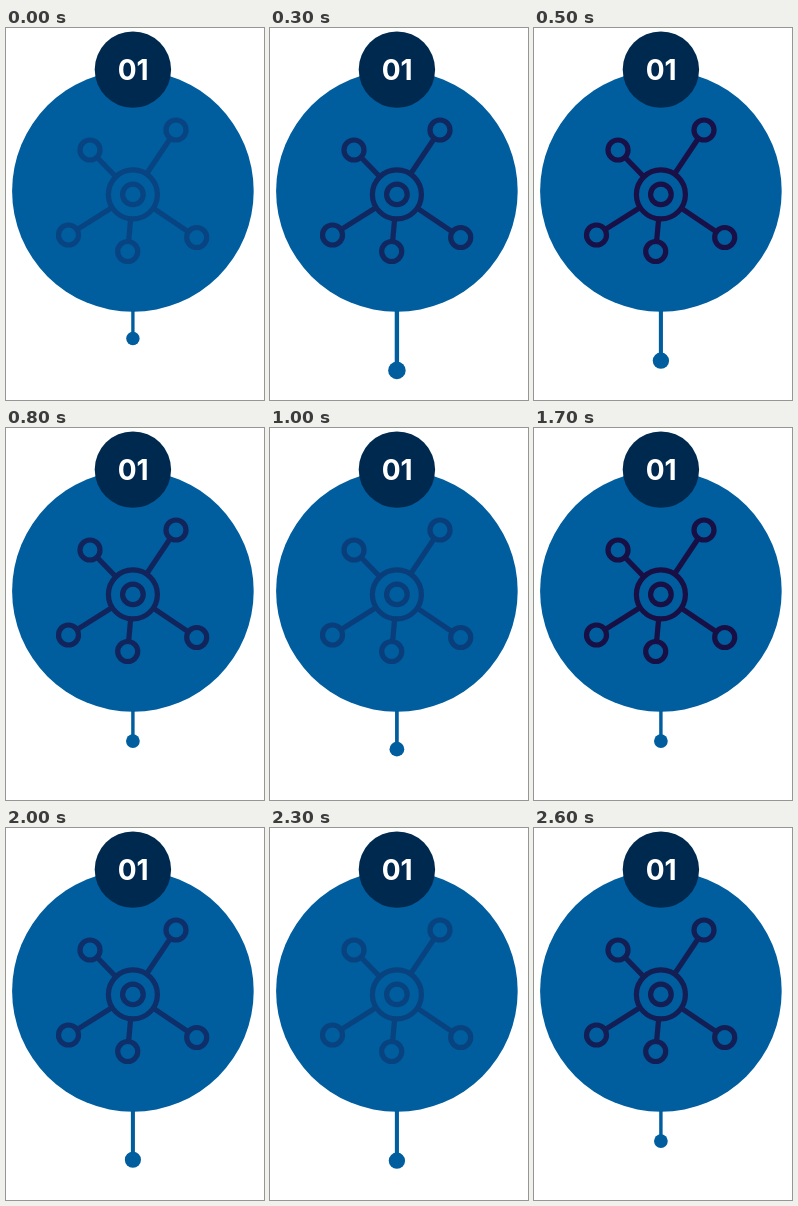
These frames come from a looping animation (258x372 px, 2.7 s). An HTML page with a canvas:

```html
<!DOCTYPE html>
<html lang="en">
<head>
<meta charset="utf-8">
<title>Network badge</title>
<style>
  html, body { margin: 0; width: 100%; height: 100%; overflow: hidden; background: #fff; }
  canvas { display: block; width: 258px; height: 372px; }
</style>
</head>
<body>
<canvas id="stage"></canvas>
<script>
const WIDTH = 258, HEIGHT = 372, LOOP = 2700, STEP = 100;
const BLUE = [0, 93, 158], INK = [24, 15, 68];
const NAVY = '#00294f';
const HUB = [126.9, 166.4];
const NODES = [[170, 102], [84, 122], [62.5, 207], [121.7, 223.5], [190.7, 209.5]];
const HUB_RADIUS = 24.5, CORE_RADIUS = 10.3, NODE_RADIUS = 10;
const PIN_X = 126.9, PIN_TOP = 310.5, PIN_TRAVEL = 34;

const canvas = document.getElementById('stage');
const ctx = canvas.getContext('2d');
const ratio = window.devicePixelRatio || 1;
canvas.width = WIDTH * ratio;
canvas.height = HEIGHT * ratio;
ctx.scale(ratio, ratio);

const rgb = color => `rgb(${color.map(Math.round).join(',')})`;
const mix = (a, b, k) => a.map((v, i) => v + (b[i] - v) * k);

// Three stretches per loop: a quick drop, a slower return and a short rest
function stretch(now) {
  const period = LOOP / 3, drop = 320, back = 520;
  const t = now % period;
  return t < drop ? t / drop : Math.max(0, 1 - (t - drop) / back);
}

// Ink pulse; its period does not divide the loop, so it restarts abruptly
const pulse = now => (1 - Math.cos(Math.PI * 2 * now / 1120)) / 2;

function disc(x, y, r, color) {
  ctx.fillStyle = color;
  ctx.beginPath();
  ctx.arc(x, y, r, 0, Math.PI * 2);
  ctx.fill();
}

function ring([x, y], r) {
  ctx.beginPath();
  ctx.arc(x, y, r, 0, Math.PI * 2);
  ctx.stroke();
}

function line(x0, y0, x1, y1) {
  ctx.beginPath();
  ctx.moveTo(x0, y0);
  ctx.lineTo(x1, y1);
  ctx.stroke();
}

function drawPin(amount) {
  const y = PIN_TOP + PIN_TRAVEL * amount;
  const radius = 6.7 + 2.2 * amount;
  ctx.strokeStyle = rgb(BLUE);
  ctx.lineWidth = radius * 0.5;
  line(PIN_X, 270, PIN_X, y);
  disc(PIN_X, y, radius, rgb(BLUE));
}

function drawNetwork(strength) {
  ctx.strokeStyle = rgb(mix(BLUE, INK, strength));
  ctx.lineWidth = 5.2;
  ring(HUB, HUB_RADIUS);
  ring(HUB, CORE_RADIUS);
  for (const node of NODES) {
    const dx = node[0] - HUB[0], dy = node[1] - HUB[1];
    const length = Math.hypot(dx, dy);
    const ux = dx / length, uy = dy / length;
    ring(node, NODE_RADIUS);
    line(HUB[0] + ux * HUB_RADIUS, HUB[1] + uy * HUB_RADIUS,
         node[0] - ux * NODE_RADIUS, node[1] - uy * NODE_RADIUS);
  }
}

function drawBadge() {
  disc(126.9, 41.6, 38.2, NAVY);
  ctx.fillStyle = '#fff';
  ctx.font = '700 28px Inter, "Open Sans", sans-serif';
  ctx.textAlign = 'center';
  ctx.fillText('01', 127.2, 52);
}

function render(elapsed) {
  const now = Math.floor((elapsed % LOOP) / STEP) * STEP;
  ctx.fillStyle = '#fff';
  ctx.fillRect(0, 0, WIDTH, HEIGHT);
  drawPin(stretch(now));
  disc(126.9, 163, 120.8, rgb(BLUE));
  drawNetwork(0.32 + 0.68 * pulse(now));
  drawBadge();
}

let start;
function tick(now) {
  start ??= now;
  render(now - start);
  requestAnimationFrame(tick);
}
render(0);
requestAnimationFrame(tick);
</script>
</body>
</html>
```
